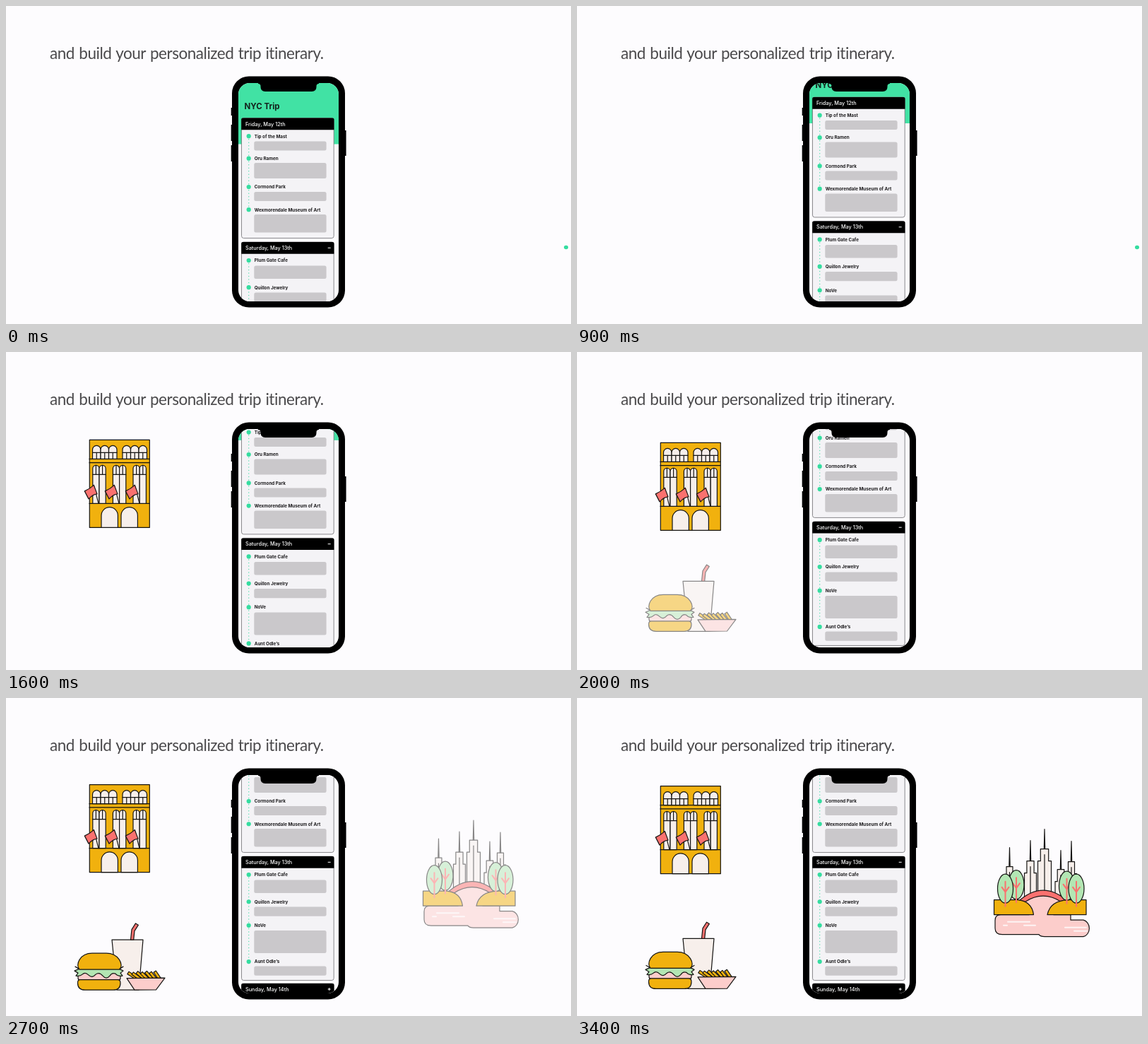
An HTML page for the animation above (3.5 s loop, 800 px wide and 450 px high).

```html
<!DOCTYPE html>
<html lang="en">
<head>
<meta charset="utf-8">
<title>Trip itinerary</title>
<style>
  html, body { margin: 0; width: 100%; height: 100%; overflow: hidden; background: #fdfcfe; }
  svg { display: block; width: 800px; height: 450px; }
  text { font-family: Inter, "Liberation Sans", sans-serif; }
  .headline { font: 22.5px Lato, "Open Sans", sans-serif; font-variant-ligatures: none; letter-spacing: -.46px; word-spacing: 1px; fill: #4b4a4c; }
  .title { font-size: 11.5px; font-weight: 700; fill: #14231d; }
  .date { font-size: 7.3px; font-weight: 500; fill: #fff; }
  .place { font-size: 6.3px; font-weight: 700; fill: #1c1b1d; }
  .card { fill: #f4f3f6; stroke: #6f6e71; stroke-width: .8; }
  .bar { fill: #cac8cb; }
  .dot { fill: #35dda0; }
  .trail { stroke: #5fe0b4; stroke-width: 1.5; stroke-linecap: round; stroke-dasharray: 0 4.5; }
  .sign { stroke: #fff; stroke-width: 1; fill: none; }
  .art { stroke: #151413; stroke-width: 1.2; stroke-linejoin: round; stroke-linecap: round; fill: none; }
  .gold { fill: #f1b10e; }
  .cream { fill: #f7efeb; }
  .red { fill: #fa716f; }
  .pink { fill: #fccdcb; }
  .green { fill: #b3e6b3; }
  .branch { stroke: #fa716f; stroke-width: 2; }
  .glint { stroke: #fdf4f4; stroke-width: 2; }
</style>
</head>
<body>
<svg viewBox="0 0 800 450">
  <defs>
    <clipPath id="glass"><rect x="329" y="109" width="142" height="309" rx="16"/></clipPath>
  </defs>
  <text class="headline" x="62" y="74.5">and build your personalized trip itinerary.</text>

  <g id="building" class="art">
    <rect class="gold" x="118.3" y="124" width="85" height="124"/>
    <path d="M118 151H203M118 156.3H203M118 214H203"/>
    <g id="windows" class="cream"></g>
    <path class="cream" d="M135 248V231a11.7 11.7 0 0 1 23.4 0V248ZM163 248V231a11.7 11.7 0 0 1 23.4 0V248Z"/>
    <g id="flags"></g>
  </g>

  <g id="meal" class="art">
    <path class="cream" d="M150 338H194L188 409H157Z"/>
    <path class="red" d="M176.5 338L178 323.5L183.5 314.8L187.3 317.2L182 325.5L180.7 338Z"/>
    <g id="fries" class="gold"></g>
    <path class="pink" d="M171 392.5L225 392L212.5 408.7L182 409Z"/>
    <rect class="pink" x="102" y="382" width="60" height="13" rx="3"/>
    <path class="green" d="M97 382L104 379H160L166 382L162 385L165 389Q158 390 155 386Q150 384 147 389Q142 395 137 389Q132 383 127 387Q122 393 117 388Q112 383 108 387Q105 390 99 389L102 385Z"/>
    <path class="gold" d="M104 380C98 374 104 357 122 357H142C160 357 167 374 161 380Z"/>
    <path class="gold" d="M105 394.5H158Q162 394.5 162 399Q162 409 152 409H112Q101.5 409 101.5 399Q101.5 394.5 105 394.5Z"/>
    <path d="M98 376L103 379M166 376L161 379"/>
  </g>

  <g id="park" class="art">
    <g id="towers" class="cream"></g>
    <path class="pink" stroke="none" d="M630 312V293Q660 272 690 293V319H630Z"/>
    <path class="pink" d="M640 311H600Q592 311 592 319V330Q592 339 602 339H654Q656 342 662 342H717A10.5 12 0 0 0 717 318.5H699V311H675"/>
    <path class="glint" d="M610 321H641M604 326H609M633 326H649M691 329H721M704 334H722"/>
    <path class="red" d="M624 293Q660 260 696 293H686Q660 276 634 293Z"/>
    <path class="gold" d="M590.5 311V290H624Q644 292 646.5 311ZM666 311Q670 291 696 290H721V311Z"/>
    <g id="trees"></g>
  </g>

  <g>
    <path d="M318.7 144h4v11h-4zM318.7 168h4v23h-4zM318.7 197h4v23h-4zM478 176h3.6v36h-3.6z"/>
    <rect x="320" y="99.5" width="160" height="327" rx="24"/>
    <g clip-path="url(#glass)">
      <rect x="329" y="109" width="142" height="309" fill="#fcfbfd"/>
      <g id="list">
        <rect x="329" y="80" width="142" height="115.5" fill="#41e2a4"/>
        <text class="title" x="337.5" y="146">NYC Trip</text>
      </g>
    </g>
    <path d="M357 108H443V110Q439.5 110 439.5 113.5V114.5Q439.5 121 433 121H367Q360.5 121 360.5 114.5V113.5Q360.5 110 357 110Z"/>
  </g>
  <ellipse id="speck" class="dot" cx="793" cy="341.5" rx="3" ry="2.7"/>
</svg>
<script>
const $ = id => document.getElementById(id);
const add = (id, markup) => $(id).insertAdjacentHTML('beforeend', markup);
const clamp = v => Math.min(1, Math.max(0, v));

// Each stop is [name, centre y, bar top, bar height]
const days = [
  { date: 'Friday, May 12th', top: 158.5, end: 328.5, sign: '', stops: [
    ['Tip of the Mast', 184.2, 191.5, 13], ['Oru Ramen', 215.7, 222, 22],
    ['Cormond Park', 256, 263, 13], ['Wexmorendale Museum of Art', 288.2, 295, 25.5]] },
  { date: 'Saturday, May 13th', top: 334, end: 509.5, sign: 'M455.7 342.3h4', stops: [
    ['Plum Gate Cafe', 360, 367.5, 18.5], ['Quillon Jewelry', 398.2, 405.5, 13.3],
    ['NoVe', 431.8, 439, 32], ['Aunt Odle\u2019s', 483, 489.5, 13.3]] },
  { date: 'Sunday, May 14th', top: 514, end: 560, sign: 'M455.7 522h4m-2-2v4', stops: [] }
];

function dayCard({ date, top, end, sign, stops }) {
  let out = `<rect class="card" x="333.5" y="${top}" width="130.7" height="${end - top}" rx="3"/>
    <path d="M333.2 ${top + 16.7}V${top + 2}q0-2 2-2H462.5q2 0 2 2V${top + 16.7}Z"/>
    <text class="date" x="339" y="${top + 11}">${date}</text><path class="sign" d="${sign}"/>`;
  if (stops.length) out += `<path class="trail" d="M343.7 ${stops[0][1]}V${stops[stops.length - 1][1]}"/>`;
  for (const [name, y, barTop, height] of stops)
    out += `<circle class="dot" cx="343.7" cy="${y}" r="3.1"/>
      <text class="place" x="351.7" y="${y + 2.3}">${name}</text>
      <rect class="bar" x="351.3" y="${barTop}" width="102.3" height="${height}" rx="2.5"/>`;
  return out;
}
add('list', days.map(dayCard).join(''));

// Building details
const arch = (x, y, w, bottom) =>
  `<path d="M${x} ${bottom}V${y + w / 2}a${w / 2} ${w / 2} 0 0 1 ${w} 0V${bottom}Z"/>`;
for (const x of [122.5, 165]) {
  for (let i = 0; i < 3; i++)
    add('windows', arch(x + i * 11.5, 132, 11.5, 151) + `<path d="M${x + i * 11.5 + 5.75} 142V151"/>`);
  add('windows', `<path d="M${x} 142h34.5"/>`);
}
for (let i = 0; i < 3; i++) {
  const x = 122.8 + i * 28.6;
  add('windows', arch(x, 160, 9.2, 214) + arch(x + 9.2, 160, 9.2, 214) +
    `<path d="M${x} 173h18.4M${x + 4.6} 160V173M${x + 13.8} 160V173"/>`);
  add('flags', `<g transform="translate(${i * 29})"><path d="M124.3 188L131 214"/>
    <path class="red" d="M124.3 188Q119 193 111.3 196.5L117 207.5Q123 201 129 200.5Z"/></g>`);
}

// Fries lean the same way, in an overlapping row
for (let i = 0; i < 7; i++) {
  const x = 178 + i * 6, y = 388 + (i % 2);
  add('fries', `<rect x="${x - 2}" y="${y - 6}" width="4" height="13" transform="rotate(${-58 + i * 4} ${x} ${y})"/>`);
}

// Skyline and trees
const tower = (x, tip, roof, w) => {
  const half = w / 2, neck = w * .3, step = roof + 17;
  return `<path d="M${x} ${tip}L${x - .7} ${roof}h1.4Z"/>
    <path d="M${x - half} 292V${step}H${x - neck}V${roof}H${x + neck}V${step}H${x + half}V292Z"/>
    <path d="M${x} ${roof + 8}V292"/>`;
};
add('towers', tower(612.5, 216, 243, 15) + tower(700, 207, 236, 15) + tower(685, 220, 247, 16) +
  tower(642, 206, 235, 17) + tower(662, 190, 218, 19));
const tree = (x, y) => `<ellipse class="green" cx="${x}" cy="${y}" rx="11" ry="20.5"/>
  <path class="branch" d="M${x} ${y - 10}V${y + 25}M${x - 5} ${y - 2}L${x} ${y + 5}L${x + 5} ${y - 2}"/>`;
add('trees', tree(622, 268.5) + tree(606.5, 274) + tree(693.5, 270) + tree(707, 274));

// Constant speed with eased start and stop, in px per ms
function scrollAt(t) {
  const speed = .0587, start = 20, cruise = 774, brake = 2090, stop = 2450;
  const mid = (start + cruise) / 2;
  if (t < start) return 0;
  if (t < cruise) return speed * (t - start) ** 2 / (2 * (cruise - start));
  const total = speed * ((brake + stop) / 2 - mid);
  if (t < brake) return speed * (t - mid);
  return total - speed * Math.max(0, stop - t) ** 2 / (2 * (stop - brake));
}

// Pictures drop in, fade up, then bob
const actors = [
  { id: 'building', start: 1150, rest: 2.5, swing: 4.3 },
  { id: 'meal', start: 1850, rest: .8, swing: -3.7 },
  { id: 'park', start: 2550, rest: -2.3, swing: 4.6 }
];
function pose({ id, start, rest, swing }, t) {
  const p = clamp((t - start) / 300), shown = p * p * (3 - 2 * p);
  const bob = swing * clamp((t - start - 200) / 500) * Math.cos(2 * Math.PI * (t - 3020) / 560);
  $(id).setAttribute('transform', `translate(0 ${(rest + bob - 29 * (1 - shown)).toFixed(2)})`);
  $(id).setAttribute('opacity', shown.toFixed(3));
}

const LOOP = 3500, STEP = 100, begin = performance.now();
function draw() {
  const t = Math.floor((performance.now() - begin) % LOOP / STEP) * STEP;
  $('list').setAttribute('transform', `translate(0 ${-scrollAt(t).toFixed(2)})`);
  actors.forEach(a => pose(a, t));
  $('speck').setAttribute('opacity', t < 1300 ? 1 : 0);
  requestAnimationFrame(draw);
}
draw();
</script>
</body>
</html>
```
